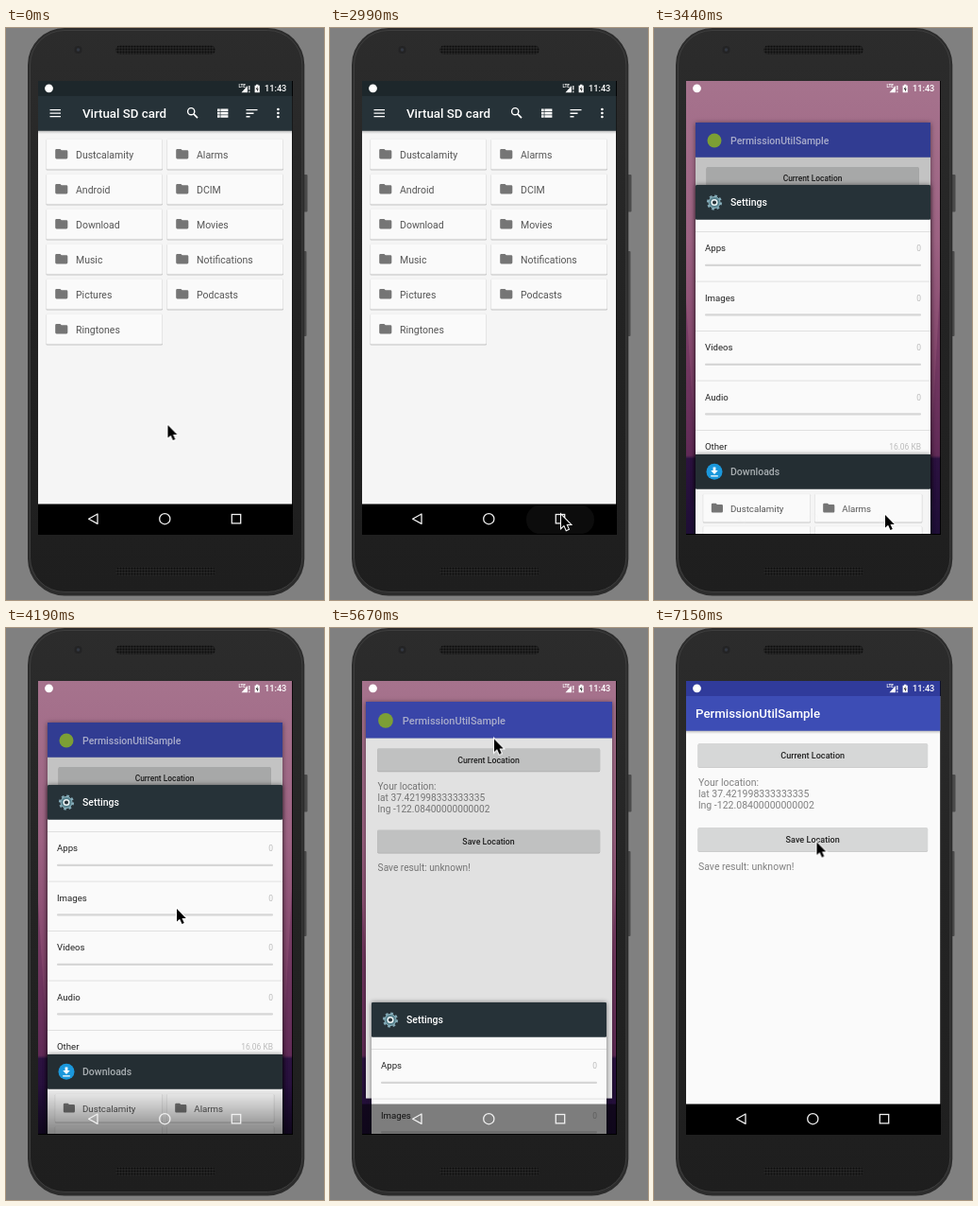
Animation of 337x605 px, one loop 8 s. Source, as an HTML page:

```html
<!DOCTYPE html>
<html lang="en">
<head>
<meta charset="utf-8">
<title>Phone demo</title>
<style>
html, body { margin: 0; width: 100%; height: 100%; overflow: hidden; background: #808080; }
svg { display: block; }
text { font-family: Roboto, "Noto Sans", sans-serif; font-size: 10.5px; }
.title { font-size: 13.3px; font-weight: 500; fill: #fff; }
.head { font-weight: 500; }
.btn { font-size: 9.1px; font-weight: 500; fill: #222; text-anchor: middle; }
.name { fill: #555; }
.note { fill: #808080; }
.label { font-size: 9.65px; fill: #222; }
.value { font-size: 8.45px; fill: #bbb; text-anchor: end; }
.clock { font-size: 9.2px; font-weight: 500; fill: #fff; }

.anim { animation: 8s step-end infinite; }
#files-app { animation-name: files; }
#recents { animation-name: recents; visibility: hidden; }
#perm-app { animation-name: perm; visibility: hidden; }
#card-perm { animation-name: card-perm; }
#card-settings { animation-name: card-settings; }
#card-down { animation-name: card-down; }
#dim { animation-name: dim; opacity: .22; }
#bar { animation-name: bar; }
#keys { animation-name: keys; }
#scrim { animation-name: scrim; opacity: 0; }
#ripple { animation-name: ripple; opacity: 0; }
.close { animation-name: close; opacity: 0; }
#edge { animation-name: edge; visibility: hidden; }
#cursor { animation-name: cursor; transform: translate(171.5px, 420px); }

@keyframes files { 39.25% { visibility: hidden; } 100% { visibility: hidden; } }
@keyframes recents { 39.25% { visibility: visible; } 72.75% { visibility: hidden; } }
@keyframes perm { 72.75% { visibility: visible; } 100% { visibility: visible; } }
@keyframes edge { 72.75% { visibility: visible; } 74.625% { visibility: hidden; } }
@keyframes dim { 70.875% { opacity: .1; } }
@keyframes card-perm {
  70.875% { transform: translate(-8.1px, -26.8px) scale(1.048); }
}
@keyframes card-settings { 70.875% { transform: translateY(230px); } }
@keyframes card-down {
  39.25% { transform: translate(-5.4px, -215px) scale(1.032); }
  41.125% { transform: translateY(-36px); }
  43% { transform: none; }
  70.875% { transform: translateY(90px); }
}
@keyframes bar {
  39.25% { opacity: .6; } 41.125% { opacity: .2; } 43% { opacity: 0; }
  70.875% { opacity: .5; } 72.75%, 100% { opacity: 1; }
}
@keyframes keys {
  39.25% { opacity: .6; } 41.125% { opacity: .3; } 43% { opacity: .15; }
  44.875% { opacity: .6; } 46.75%, 100% { opacity: 1; }
}
@keyframes scrim {
  44.875% { opacity: .5; } 46.75% { opacity: 1; } 70.875% { opacity: 0; }
}
@keyframes ripple {
  29.875% { opacity: .5; } 31.75% { opacity: .8; } 33.625% { opacity: 1; }
  37.375% { opacity: .8; } 39.25% { opacity: 0; }
}
@keyframes close {
  58% { opacity: .4; } 59.875% { opacity: .8; } 61.75% { opacity: 1; }
  70.875% { opacity: 0; }
}
@keyframes cursor {
  18.75% { transform: translate(202px, 477.5px); }
  20.625% { transform: translate(228px, 506px); }
  22.5% { transform: translate(240px, 517px); }
  24.375% { transform: translate(244.5px, 518.5px); }
  26.125% { transform: translate(245px, 515px); }
  50.5% { transform: translate(245px, 425px); }
  52.375% { transform: translate(181px, 297px); }
  54.25% { transform: translate(180px, 257px); }
  58% { transform: translate(175px, 212px); }
  59.875% { transform: translate(167px, 168px); }
  61.75% { transform: translate(169px, 136px); }
  63.625% { transform: translate(172px, 122px); }
  65.375% { transform: translate(174px, 117.5px); }
  78.375% { transform: translate(176px, 150px); }
  80.25% { transform: translate(186px, 205px); }
  82.125% { transform: translate(195px, 247px); }
  84% { transform: translate(199px, 267px); }
  85.75% { transform: translate(192px, 254px); }
  87.625% { transform: translate(178px, 235px); }
  89.375%, 100% { transform: translate(172.5px, 226.5px); }
}
</style>
</head>
<body>
<svg width="337" height="605" viewBox="0 0 337 605">
  <defs>
    <linearGradient id="wall" x2="0" y2="1">
      <stop offset="0" stop-color="#a6738d"/>
      <stop offset=".35" stop-color="#9c6282"/>
      <stop offset=".6" stop-color="#84476c"/>
      <stop offset=".825" stop-color="#642f5a"/>
      <stop offset=".832" stop-color="#2c1240"/>
      <stop offset="1" stop-color="#1e0e36"/>
    </linearGradient>
    <linearGradient id="shade" x2="0" y2="1">
      <stop offset="0" stop-opacity=".28"/>
      <stop offset="1" stop-opacity="0"/>
    </linearGradient>
    <linearGradient id="fade" x2="0" y2="1">
      <stop offset="0" stop-opacity="0"/>
      <stop offset="1" stop-opacity=".48"/>
    </linearGradient>
    <linearGradient id="shell" x2="0" y2="1">
      <stop offset="0" stop-color="#2c2c2c"/>
      <stop offset=".5" stop-color="#232323"/>
      <stop offset="1" stop-color="#1e1e1e"/>
    </linearGradient>
    <pattern id="mesh" width="3" height="3" patternUnits="userSpaceOnUse">
      <rect width="3" height="3" fill="#262626"/>
      <circle cx="1.5" cy="1.5" r="1.1" fill="#0c0c0c"/>
    </pattern>
    <filter id="glow" x="-10%" y="-10%" width="120%" height="120%">
      <feDropShadow dx="0" dy="0" stdDeviation="2.5" flood-opacity=".5"/>
    </filter>
    <clipPath id="screen"><rect x="34" y="56" width="269.3" height="479"/></clipPath>

    <path id="folder" d="M10 4H4q-2 0-2 2v12q0 2 2 2h16q2 0 2-2V8q0-2-2-2h-8z" fill="#757575"/>
    <path id="x" d="M-4.2-4.2 4.2 4.2M4.2-4.2-4.2 4.2" fill="none" stroke-width="1.3"/>

    <g id="files">
      <rect x="34" y="72" width="269.3" height="432" fill="#f5f5f5"/>
      <rect x="34" y="108" width="269.3" height="4" fill="url(#shade)"/>
      <rect x="34" y="72" width="269.3" height="36.75" fill="#263238"/>
      <text class="title" x="81" y="95">Virtual SD card</text>
      <g fill="none" stroke="#fff" stroke-width="1.4">
        <path d="M46.5 86.6h11.5m-11.5 3.5h11.5m-11.5 3.5h11.5"/>
        <circle cx="196.2" cy="88.2" r="3.6"/>
        <path d="m198.8 90.9 4.2 4.2" stroke-width="1.7"/>
        <path d="M254.5 86.6h12m-12 3.6h8m-8 3.6h4"/>
      </g>
      <path d="M224 85.6h2.7v2.6h-2.7zm0 3.3h2.7v2.6h-2.7zm0 3.3h2.7v2.6h-2.7zM227.4 85.6h8v2.6h-8zm0 3.3h8v2.6h-8zm0 3.3h8v2.6h-8z" fill="#fff"/>
      <g fill="#fff">
        <circle cx="288.4" cy="86" r="1.35"/>
        <circle cx="288.4" cy="90" r="1.35"/>
        <circle cx="288.4" cy="94" r="1.35"/>
      </g>
      <g id="grid"></g>
    </g>

    <g id="perm">
      <rect x="34" y="72" width="269.3" height="432" fill="#fafafa"/>
      <rect x="34" y="108" width="269.3" height="4" fill="url(#shade)"/>
      <rect x="34" y="72" width="269.3" height="36.75" fill="#3d4db5"/>
      <text class="title" x="44" y="95">PermissionUtilSample</text>
      <g id="buttons"></g>
      <text class="note" x="47" y="167">Your location:</text>
      <text class="note" x="47" y="179.2">lat 37.421998333333335</text>
      <text class="note" x="47" y="191.4">lng -122.08400000000002</text>
      <text class="note" x="47" y="256">Save result: unknown!</text>
    </g>
  </defs>

  <!-- phone -->
  <rect width="337" height="605" fill="#808080"/>
  <rect x="314" y="155" width="5.5" height="39.5" rx="1" fill="#4a4a4a"/>
  <rect x="314" y="236" width="4.5" height="90" rx="1" fill="#4a4a4a"/>
  <rect x="23" y="0" width="293.3" height="600.5" rx="39" fill="#2c2c2c"/>
  <rect x="25.5" y="2.5" width="288.3" height="594" rx="36.5" fill="url(#shell)" stroke="#3e3e3e"/>
  <circle cx="76.5" cy="23" r="4" fill="#232324"/>
  <circle cx="76.5" cy="23" r="1.8" fill="#333842"/>
  <rect x="116" y="18.5" width="106" height="9.5" rx="4.7" fill="url(#mesh)"/>
  <rect x="116" y="570" width="106" height="9.5" rx="4.7" fill="url(#mesh)"/>
  <rect x="34" y="56" width="270" height="480"/>

  <g clip-path="url(#screen)">
    <g id="files-app" class="anim">
      <rect x="34" y="56" width="269.3" height="16.2" fill="#1d272b"/>
      <use href="#files"/>
    </g>

    <g id="recents" class="anim">
      <rect x="34" y="56" width="269.3" height="480" fill="url(#wall)"/>
      <path d="M34 290l10 163H34zM303.3 270v183h-10z" fill="#5a2450" opacity=".4"/>

      <g id="card-perm" class="anim">
        <g filter="url(#glow)">
          <use href="#perm" transform="translate(44 100.8) scale(.9246) translate(-34 -72)"/>
        </g>
        <rect x="44" y="100" width="249" height="36.75" fill="#3f4dbb"/>
        <rect id="dim" class="anim" x="44" y="100" width="249" height="400"/>
        <circle cx="64" cy="119" r="7.5" fill="#7c9f35"/>
        <text class="head" x="81" y="122.8" fill="#a9accb">PermissionUtilSample</text>
        <g transform="translate(274 118.7)"><use href="#x" class="anim close" stroke="#b3b7d6"/></g>
      </g>

      <g id="card-settings" class="anim">
        <rect x="44" y="166" width="249" height="400" rx="1.5" fill="#fafafa" filter="url(#glow)"/>
        <rect x="44" y="166" width="249" height="36.75" rx="1" fill="#263238"/>
        <circle cx="64" cy="184.5" r="6.8" fill="none" stroke="#84abb8" stroke-width="2.6" stroke-dasharray="2.67"/>
        <circle cx="64" cy="184.5" r="6" fill="#55818d" stroke="#8fb5c0" stroke-width="1"/>
        <circle cx="64" cy="184.5" r="2.8" fill="#263238" stroke="#eef5f6" stroke-width="1.5"/>
        <text class="head" x="81" y="188.3" fill="#fff">Settings</text>
        <g id="rows"></g>
        <g transform="translate(274 184.2)"><use href="#x" class="anim close" stroke="#fff"/></g>
      </g>

      <g id="card-down" class="anim">
        <g filter="url(#glow)">
          <use href="#files" transform="translate(44 451) scale(.9246) translate(-34 -72)"/>
        </g>
        <rect x="44" y="451" width="249" height="36.75" rx="1" fill="#242e33"/>
        <circle cx="64" cy="469.3" r="8.5" fill="#1b98dc"/>
        <path d="M62.6 464.5h2.8v3.6h2.4L64 472l-3.8-3.9h2.4zM60.2 473.2h7.6v1.3h-7.6z" fill="#fff"/>
        <text class="head" x="81" y="473" fill="#a9afb2">Downloads</text>
        <g transform="translate(274 469.2)"><use href="#x" class="anim close" stroke="#d2d5d6"/></g>
      </g>
      <rect id="scrim" class="anim" x="34" y="484" width="269.3" height="52" fill="url(#fade)"/>
    </g>

    <g id="perm-app" class="anim">
      <rect x="34" y="56" width="269.3" height="16.2" fill="#303b9b"/>
      <use href="#perm"/>
    </g>

    <!-- system bars -->
    <rect id="bar" class="anim" x="34" y="503.5" width="270" height="33"/>
    <rect id="ripple" class="anim" x="208" y="504.5" width="72" height="31" rx="15" fill="#0f0f0f"/>
    <g id="keys" class="anim" fill="none" stroke="#f0f0f0" stroke-width="1.3">
      <path d="M97 514v10.4l-9.4-5.2z" stroke-linejoin="round"/>
      <circle cx="168.3" cy="519.2" r="5.6"/>
      <rect x="239.3" y="514.5" width="9.4" height="9.4"/>
    </g>
    <g id="edge" class="anim">
      <rect x="302.3" y="56" width="1.2" height="448" fill="#5a2c63"/>
      <rect x="44" y="533.8" width="249" height="1" fill="#777"/>
    </g>
    <g fill="#fff">
      <circle cx="45.5" cy="63.8" r="4.4"/>
      <text x="246.5" y="62.8" style="font-size:4.6px;font-weight:700">LTE</text>
      <path d="M249.5 68.3h6.5v-7.2z"/>
      <path d="M257.2 61h1.2v4.6h-1.2zm0 5.8h1.2v1.5h-1.2z"/>
      <path d="M265 59.8h2.4v.9h1.4v7.6h-5.2v-7.6h1.4z"/>
      <path d="M266.5 61.8 264.7 65h1.3v2.4l1.7-3.2h-1.2z" fill="#333"/>
      <text class="clock" x="274" y="67.3">11:43</text>
    </g>
  </g>

  <path id="cursor" class="anim" d="M0 0v13.6l3.1-2.9 2.4 5.4 2.3-1-2.3-5.2h4.3z" stroke="#fff" stroke-width="2" paint-order="stroke"/>
</svg>
<script>
const fill = (id, html) => { document.getElementById(id).innerHTML = html; };

const folders = ["Dustcalamity", "Alarms", "Android", "DCIM", "Download", "Movies",
  "Music", "Notifications", "Pictures", "Podcasts", "Ringtones"];
fill("grid", folders.map((name, i) => {
  const x = 42.5 + (i % 2) * 128;
  const y = 117.2 + Math.floor(i / 2) * 37;
  return `<g transform="translate(${x} ${y})">
    <rect y=".6" width="123.4" height="32.6" rx="1" fill="#c4c4c4"/>
    <rect x=".2" width="122.8" height="32" rx="1" fill="#fafafa" stroke="#e8e8e8" stroke-width=".5"/>
    <use href="#folder" transform="translate(8.4 8.1) scale(.656)"/>
    <text class="name" x="31.5" y="20.7">${name}</text></g>`;
}).join(""));

fill("buttons", [["Current Location", 122], ["Save Location", 211]].map(([label, y]) =>
  `<rect x="46.5" y="${y + .8}" width="243.6" height="25" rx="1.5" fill="#bdbdbd"/>
   <rect x="46.5" y="${y}" width="243.6" height="25" rx="1.5" fill="#d6d7d7"/>
   <text class="btn" x="168.2" y="${y + 16}">${label}</text>`).join(""));

fill("rows", ["Apps", "Images", "Videos", "Audio", "Other"].map((label, i) => {
  const y = 215.5 + i * 52.5;
  return `<rect x="44" y="${y - .4}" width="249" height=".9" fill="#dedede"/>
    <text class="label" x="54" y="${y + 20.8}">${label}</text>
    <text class="value" x="283" y="${y + 20.8}">${i < 4 ? "0" : "16.06 KB"}</text>
    <rect x="54" y="${y + 34.2}" width="229" height="2.2" rx="1" fill="#d6d6d6"/>`;
}).join(""));
</script>
</body>
</html>
```
